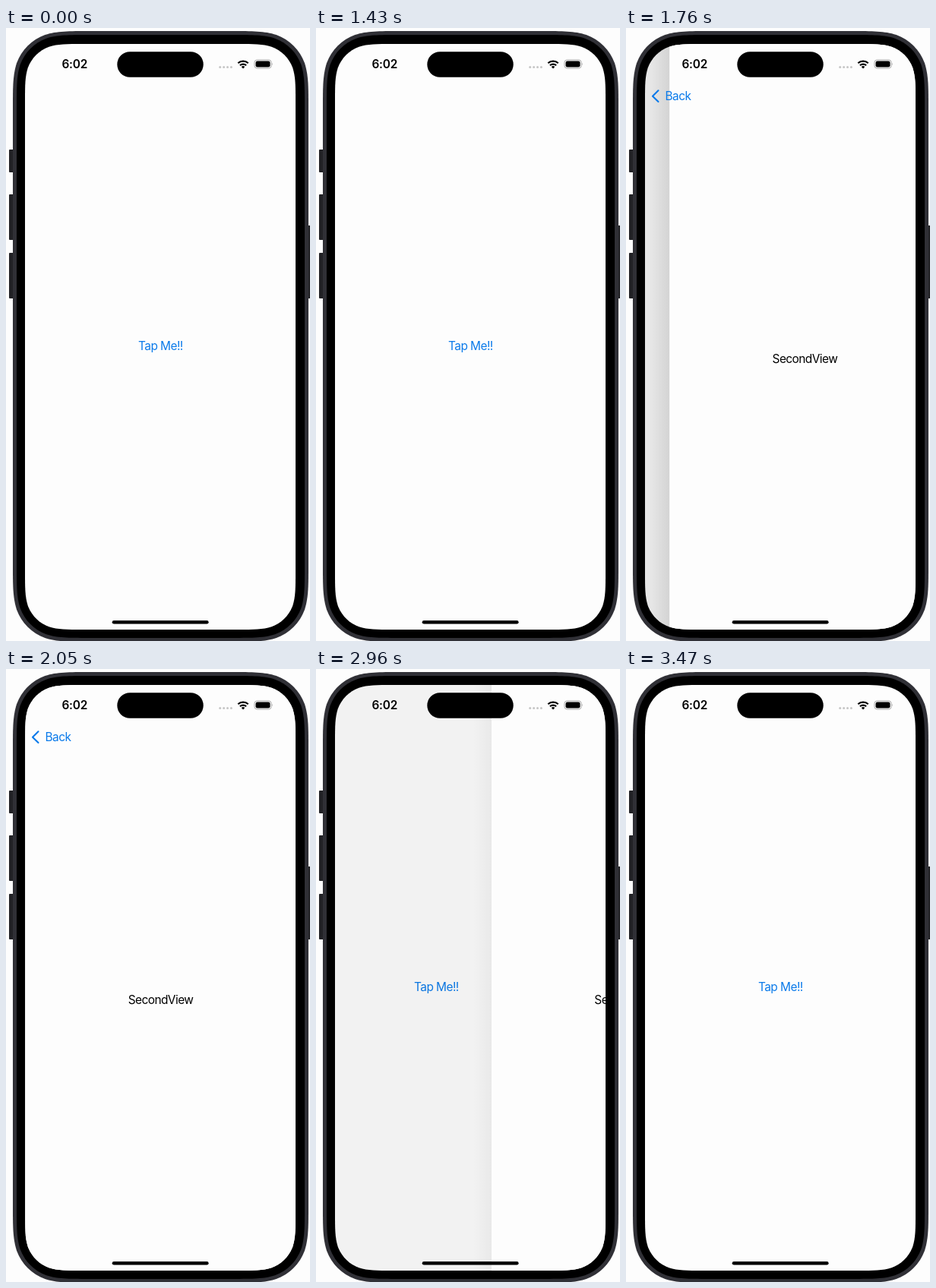
An HTML page for the animation above (3500 ms loop, 400 px wide and 807 px high).

```html
<!DOCTYPE html>
<html lang="en">
<head>
<meta charset="utf-8">
<title>Navigation push and pop</title>
<style>
  html, body { margin: 0; width: 100%; height: 100%; overflow: hidden; background: #fdfdfd; }
  svg { display: block; width: 400px; height: 807px; }
  text { font: 15.4px Inter, Roboto, sans-serif; letter-spacing: -.53px; white-space: pre; }
  .clock { font-weight: 600; letter-spacing: -.2px; }
  .link { fill: #0a7aea; }
  .page { fill: #fdfdfd; }
</style>
</head>
<body>
<svg viewBox="0 0 400 807">
  <defs>
    <clipPath id="screen"><path id="glass"/></clipPath>
    <linearGradient id="shade">
      <stop offset="0" stop-opacity="0"/>
      <stop offset="1" stop-opacity=".09"/>
    </linearGradient>
  </defs>

  <g fill="#222226">
    <rect x="4" y="160" width="6" height="30" rx="1"/>
    <rect x="4" y="219" width="6" height="60" rx="1"/>
    <rect x="4" y="296" width="6" height="60" rx="1"/>
    <rect x="397" y="260" width="4" height="96" rx="1"/>
  </g>
  <path id="rim" fill="#303036"/>
  <path id="bezel"/>

  <g clip-path="url(#screen)">
    <rect class="page" x="25" y="21" width="356" height="771"/>
    <g id="home"><text id="tap" class="link" x="174" y="423.7">Tap Me!!</text></g>
    <rect id="dim" x="25" y="21" width="356" height="771"/>
    <g id="second">
      <rect id="shadow" x="1" y="21" width="24" height="771" fill="url(#shade)"/>
      <rect class="page" x="25" y="21" width="356" height="771"/>
      <text x="160.3" y="441.3">SecondView</text>
    </g>
    <g id="back">
      <path d="M42.5 82.3 35 89.7l7.5 7.4" fill="none" stroke="#0a7aea" stroke-width="2.1" stroke-linecap="round" stroke-linejoin="round"/>
      <text class="link" x="51.5" y="95.3">Back</text>
    </g>
  </g>

  <text class="clock" x="73.4" y="53">6:02</text>
  <rect x="146.300" y="31.200" width="113.400" height="33.600" rx="16.800"/>
  <g fill="#c6c6c6">
    <circle cx="281.7" cy="51.5" r="1.5"/><circle cx="286.6" cy="51.5" r="1.5"/>
    <circle cx="291.5" cy="51.5" r="1.5"/><circle cx="296.4" cy="51.5" r="1.5"/>
  </g>
  <path d="M305.300 46.300a9.700 9.700 0 0 1 13.400 0M307.900 49.300a5.900 5.900 0 0 1 8.200 0" fill="none" stroke="#000" stroke-width="2.200"/>
  <path d="M312 53.500l-2.300-2.400a3.300 3.300 0 0 1 4.600 0z"/>
  <rect x="326.900" y="42" width="22.200" height="11" rx="3.500" fill="none" stroke="#a8a8a8"/>
  <rect x="328.500" y="43.600" width="19" height="7.800" rx="2.200"/>
  <path d="M350.300 45.700q1.500 1.800 0 3.600z" fill="#a8a8a8"/>
  <rect x="139.700" y="779.900" width="126.900" height="4.600" rx="2.300"/>
</svg>
<script>
  const LOOP = 3500, WIDTH = 356, PUSH = 1538, POP = 2853, OMEGA = 0.018;
  const tapFade = [[1450, 1], [1480, .25], [1570, .25], [1610, .42], [1760, 1]];
  const backFade = [[PUSH, 0], [1600, 1], [2600, 1], [2640, .18], [POP, .18], [2930, 0]];
  const el = id => document.getElementById(id);
  const [home, tap, dim, second, shadow, back] =
    ['home', 'tap', 'dim', 'second', 'shadow', 'back'].map(el);

  // Rectangle with continuous-curvature corners: each corner is three cubics.
  function smoothRect(x, y, w, h, r) {
    const a = 1.5287, b = 1.0885, c = .8684, d = .6315, e = .0749, f = .3728, g = .1691;
    const corner = [[0, a], [0, b], [0, c], [e, d], [g, f], [f, g], [d, e], [c, 0], [b, 0], [a, 0]];
    const place = (list, right, bottom) => list.map(([u, v]) =>
      [right ? x + w - u * r : x + u * r, bottom ? y + h - v * r : y + v * r]);
    const back = corner.slice().reverse();
    const corners = [place(corner, 0, 0), place(back, 1, 0), place(corner, 1, 1), place(back, 0, 1)];
    return corners.map(([first, ...rest], i) => `${i ? 'L' : 'M'}${first}C${rest.join(' ')}`).join('') + 'Z';
  }

  // Distance left to travel in a critically damped spring, from 1 to 0.
  function remaining(ms) {
    const x = OMEGA * Math.max(0, ms);
    return (1 + x) * Math.exp(-x);
  }

  function track(steps, t) {
    if (t <= steps[0][0]) return steps[0][1];
    for (let i = 1; i < steps.length; i++) {
      const [t0, a] = steps[i - 1], [t1, b] = steps[i];
      if (t < t1) return a + (b - a) * (t - t0) / (t1 - t0);
    }
    return steps[steps.length - 1][1];
  }

  const slide = (node, x) => node.setAttribute('transform', `translate(${x.toFixed(2)} 0)`);

  function draw(t) {
    const covered = t < POP ? 1 - remaining(t - PUSH) : remaining(t - POP);
    slide(home, -0.3 * WIDTH * covered);
    slide(second, WIDTH * (1 - covered));
    dim.setAttribute('opacity', 0.1 * covered);
    shadow.setAttribute('opacity', covered);
    tap.setAttribute('opacity', track(tapFade, t));
    back.setAttribute('opacity', track(backFade, t));
  }

  el('glass').setAttribute('d', smoothRect(25, 21, 356, 771, 50));
  el('rim').setAttribute('d', smoothRect(9, 4, 389, 804, 67));
  el('bezel').setAttribute('d', smoothRect(14, 9, 379, 794, 62));

  const start = performance.now();
  function tick() {
    draw((performance.now() - start) % LOOP);
    requestAnimationFrame(tick);
  }
  draw(0);
  requestAnimationFrame(tick);
</script>
</body>
</html>
```
